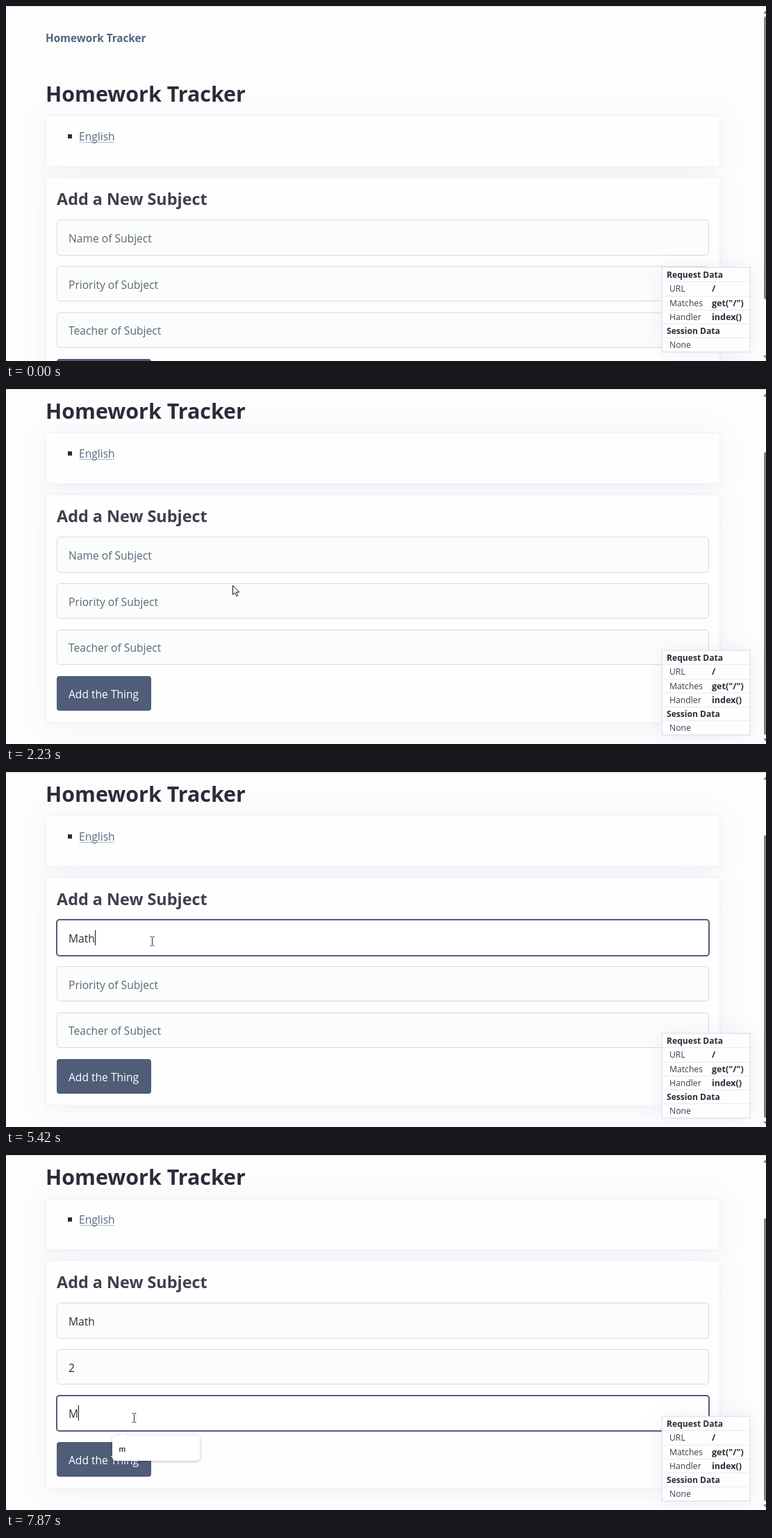
An HTML page that plays this animation: 1094 px wide and 512 px high, repeating every 8000 ms.

```html
<!DOCTYPE html>
<html lang="en">
<head>
<meta charset="utf-8">
<title>Homework Tracker</title>
<style>
  html, body { margin: 0; width: 100%; height: 100%; overflow: hidden; background: #fdfdfe; }
  svg { display: block; }
  text { font: 15.6px "Open Sans", "Noto Sans", sans-serif; fill: #2a2d3a; white-space: pre; }
  .bold { font-weight: 700; }
  .nav { font-size: 15.25px; fill: #546482; }
  .h1 { font-size: 30.4px; fill: #2a2d38; }
  .h2 { font-size: 23.4px; fill: #3c414c; }
  .link { fill: #576881; }
  .hint { fill: #5d6676; }
  .white { fill: #fff; }
  .small { font-size: 12.2px; fill: #3b3f4b; }
  .small.bold { font-size: 12.1px; fill: #2a2d38; }
  .small.value { font-size: 12.6px; }
  .menu { font-size: 10.2px; font-weight: 600; fill: #16171c; }
  .card { fill: #fefefe; stroke: #f1f2f7;
    filter: drop-shadow(0 2px 3px rgba(70, 80, 130, .03)) drop-shadow(0 2px 20px rgba(70, 80, 150, .055)); }
  .panel { fill: #fefefe; stroke: #e2e5ed; stroke-width: 1.5;
    filter: drop-shadow(0 1px 14px rgba(70, 80, 150, .08)); }
  .pop { fill: #fff; filter: drop-shadow(0 1px 2px rgba(0, 0, 0, .25)); }
  .field { fill: #fbfcfc; stroke: #d6dae3; }
  .field.focus { fill: #fff; stroke: #505d79; stroke-width: 2; }
  .rule { stroke: #e8eaf0; }
  .grey { fill: #858585; }
</style>
</head>
<body>
<svg id="stage" width="1094" height="512" viewBox="0 0 1094 512"></svg>
<script>
const LOOP = 8000, BLINK = 550, SCROLL = 95, LEFT = 90;
const stage = document.getElementById('stage');

function add(parent, tag, attrs = {}, content = '') {
  const el = document.createElementNS('http://www.w3.org/2000/svg', tag);
  set(el, attrs);
  el.textContent = content;
  return parent.appendChild(el);
}
function set(el, attrs) {
  for (const key in attrs) el.setAttribute(key, attrs[key]);
}
const label = (parent, x, y, cls, content) => add(parent, 'text', { x, y, class: cls }, content);
const box = (parent, x, y, width, height, cls, rx = 0) =>
  add(parent, 'rect', { x, y, width, height, rx, class: cls });
const show = (el, on) => el.setAttribute('visibility', on ? 'visible' : 'hidden');

// Page, laid out in its scrolled position
const page = add(stage, 'g');
label(page, 57, -43, 'bold nav', 'Homework Tracker');
box(page, 57.5, 63.5, 970, 73, 'card', 4);
box(page, 57.5, 152.5, 970, 328, 'card', 4);
label(page, 57, 43, 'bold h1', 'Homework Tracker');
add(page, 'rect', { x: 89, y: 90, width: 6, height: 6, fill: '#2a2d3a' });
label(page, 105, 99, 'link', 'English');
add(page, 'path', { d: 'M105.5 101.5H156', stroke: '#a6b9cb' });
label(page, 73, 192, 'bold h2', 'Add a New Subject');

const fields = [
  { y: 213, h: 51, base: 246, hint: 'Name of Subject' },
  { y: 280, h: 50, base: 313, hint: 'Priority of Subject' },
  { y: 347, h: 50, base: 379, hint: 'Teacher of Subject' }
];
for (const f of fields) {
  f.rect = box(page, 73.5, f.y + .5, 938, f.h, 'field', 4);
  f.text = label(page, LEFT, f.base, 'hint', f.hint);
}
const spinner = add(page, 'path', { d: 'M984.5 303l4-6.5 4 6.5zM984.5 309.5h8l-4 6z', class: 'grey' });
add(page, 'rect', { x: 73, y: 414, width: 136, height: 50, rx: 4, fill: '#505d79' });
label(page, LEFT, 446, 'white', 'Add the Thing');
const caret = add(page, 'rect', { width: 1, height: 22, fill: '#16171c' });

const menu = add(page, 'g');
add(menu, 'path', {
  d: 'M158 0H161L168-5 175 0H274a5 5 0 0 1 5 5V31a5 5 0 0 1-5 5H158a5 5 0 0 1-5-5V5a5 5 0 0 1 5-5z',
  class: 'pop'
});
const menuText = label(menu, 162.5, 22.5, 'menu', '');

// Fixed parts
add(stage, 'path', { d: 'M0 .5H1094', stroke: '#dcdde1' });
add(stage, 'path', { d: 'M1090 11l6-7 6 7zM1090 504h12l-6 7z', class: 'grey' });
const thumb = box(stage, 1091, 15, 8, 408, 'grey', 3);
box(stage, 944.5, 377, 126.5, 122, 'panel');
const rows = [['Request Data'], ['URL', '/'], ['Matches', 'get("/")'],
  ['Handler', 'index()'], ['Session Data'], ['None', '']];
rows.forEach(([name, value], i) => {
  const y = 392 + Math.round(i * 20.25);
  const head = value === undefined;
  label(stage, head ? 951 : 955, y, head ? 'small bold' : 'small', name);
  if (value) label(stage, 1016, y, 'small bold value', value);
  if (i) add(stage, 'path', { d: `M945 ${y - 14.5}H1070`, class: 'rule' });
});

const arrow = add(stage, 'path', {
  d: 'M.5.5V13.6l3-2.8 2.2 4.9 2.1-1L5.6 10H9.8z', fill: '#fff', stroke: '#15161a', 'stroke-linejoin': 'round'
});
const beam = add(stage, 'path', {
  d: 'M-3-6.5H-1L0-5.5 1-6.5H3M0-5.5V5.5M-3 6.5H-1L0 5.5 1 6.5H3', fill: 'none', stroke: '#2a2a2e'
});

// Timeline
const moves = [ // start, end, steps, target x, target y
  [380, 880, 8, 889, 437],
  [1280, 1410, 3, 606, 336],
  [1610, 1760, 3, 326, 283],
  [2640, 2940, 5, 211, 240],
  [5420, 5764, 6, 187, 318],
  [6500, 6908, 7, 184, 379]
];
const scrolls = [[0, 0], [2020, 12], [2090, 48], [2160, 82], [2230, SCROLL]];
const focuses = [[0, -1], [3020, 0], [5900, 1], [6970, 2]];
const typing = [
  [[0, ''], [4330, 'M'], [4430, 'Ma'], [4640, 'Mat'], [4940, 'Math']],
  [[0, ''], [6220, '2']],
  [[0, ''], [7870, 'M']]
];
const menus = [ // start, end, field, entry
  [3160, 4430, 0, 'English'],
  [7045, LOOP, 2, 'm']
];

const latest = (table, t) => table.filter(row => row[0] <= t).pop();
const ease = p => p < .5 ? 2 * p * p : 1 - 2 * (1 - p) ** 2;

// Position after the last completed step, and the time of that step
function pointer(t) {
  let x = 1006, y = 503, at = 0;
  for (const [start, end, steps, tx, ty] of moves) {
    if (t < start) break;
    const gap = (end - start) / (steps - 1);
    const k = Math.min(steps - 1, Math.floor((t - start) / gap + 1e-6));
    const p = ease((k + 1) / steps);
    x += (tx - x) * p;
    y += (ty - y) * p;
    at = start + k * gap;
  }
  return { x: Math.round(x), y: Math.round(y), at };
}

function hovered(p) {
  if (p.x > 943 && p.y > 376) return -1;
  const y = p.y - SCROLL + latest(scrolls, p.at)[1];
  return fields.findIndex(f => y >= f.y && y <= f.y + f.h && p.x > 73 && p.x < 1012);
}

function render(t) {
  const scroll = latest(scrolls, t)[1];
  page.setAttribute('transform', `translate(0 ${SCROLL - scroll})`);
  thumb.setAttribute('y', 15 + scroll * .8);

  const [focusAt, focus] = latest(focuses, t);
  fields.forEach((f, i) => {
    const on = i === focus;
    set(f.rect, on
      ? { x: 73, y: f.y, width: 939, height: f.h + 1, class: 'field focus' }
      : { x: 73.5, y: f.y + .5, width: 938, height: f.h, class: 'field' });
    const [typedAt, value] = latest(typing[i], t);
    f.text.textContent = value || f.hint;
    f.text.setAttribute('class', value ? '' : 'hint');
    if (on) {
      const x = LEFT + (value ? Math.round(f.text.getComputedTextLength()) : 0);
      set(caret, { x, y: f.base - 18 });
      const since = t - Math.max(focusAt, typedAt);
      show(caret, Math.floor(since / BLINK) % 2 === 0);
    }
  });
  if (focus < 0) show(caret, false);

  const open = menus.find(([start, end]) => t >= start && t < end);
  show(menu, open);
  if (open) {
    menu.setAttribute('transform', `translate(0 ${fields[open[2]].y + 58})`);
    menu.setAttribute('opacity', Math.min(1, .3 + (t - open[0]) / 190));
    menuText.textContent = open[3];
  }

  const p = pointer(t);
  const over = hovered(p);
  show(spinner, focus === 1 || (over === 1 && t > 5420));
  show(arrow, t >= 380 && over < 0);
  show(beam, t >= 380 && over >= 0);
  arrow.setAttribute('transform', `translate(${p.x} ${p.y})`);
  beam.setAttribute('transform', `translate(${p.x + .5} ${p.y})`);
}

const begin = performance.now();
function tick() {
  render((performance.now() - begin) % LOOP);
  requestAnimationFrame(tick);
}
tick();
</script>
</body>
</html>
```
